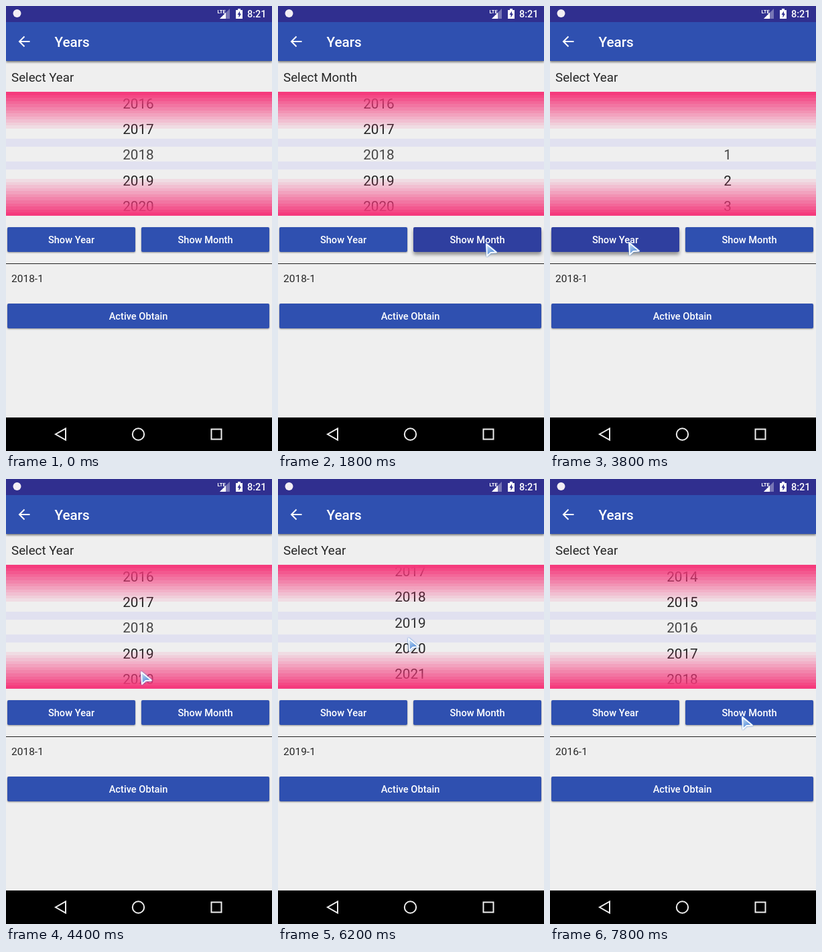
An HTML page that plays this animation: 397x664 px, repeating every 8 s.

```html
<!DOCTYPE html>
<html lang="en">
<head>
<meta charset="utf-8">
<title>Years</title>
<style>
html, body { margin: 0; width: 100%; height: 100%; overflow: hidden; background: #efefef; }
svg { display: block; width: 397px; height: 664px; font-family: Roboto, sans-serif; }
.mid { text-anchor: middle; }
.medium { font-weight: 500; fill: #fff; }
.btn rect { fill: #2f50b0; filter: drop-shadow(0 1.5px 1px #0006); }
.btn.down rect { fill: #2f3f9f; filter: drop-shadow(0 4px 2.5px #0006); }
.btn text { font-size: 14.65px; }
.nav { fill: none; stroke: #eee; stroke-width: 2; }
</style>
</head>
<body>
<svg viewBox="0 0 397 664">
  <defs>
    <linearGradient id="blue" x2=".6" y2="1">
      <stop offset="0" stop-color="#d5e8f8"/>
      <stop offset="1" stop-color="#3b7cd4"/>
    </linearGradient>
    <clipPath id="clip"><rect y="128" width="397" height="185"/></clipPath>
  </defs>
  <rect width="397" height="664" fill="#efefef"/>

  <rect y="24" width="397" height="58" fill="#2f50b0" style="filter:drop-shadow(0 2px 1.5px #0007)"/>
  <rect width="397" height="24" fill="#302f8f"/>
  <circle cx="16.5" cy="11" r="6" fill="#f3eef4"/>
  <text x="315.5" y="10.5" font-size="7.5" font-weight="700" fill="#fff">LTE</text>
  <path d="M319 19L334 4V19Z" fill="#7776b5"/>
  <path d="M319 19L328 10V19Z" fill="#fff"/>
  <path d="M343 6h3V4h4v2h3V19H343Z" fill="#fff"/>
  <path d="M349 7.5L345.5 13H347.5V17.5L351 11.5H349Z" fill="#302f8f"/>
  <text class="medium" x="360" y="17" font-size="14.5">8:21</text>
  <path d="M35.5 53H20.5M27.5 45.5L20 53L27.5 60.5" fill="none" stroke="#fff" stroke-width="2"/>
  <text class="medium" x="72.5" y="61" font-size="20.7">Years</text>

  <text id="label" x="8" y="113" font-size="18.75" fill="#262626"></text>
  <g clip-path="url(#clip)">
    <g id="wheel" class="mid" font-size="20.7"></g>
    <rect y="198" width="397" height="46" fill="#efefef" opacity=".06"/>
    <path d="M0 198H397V210H0ZM0 232H397V244H0Z" fill="#9696f0" opacity=".16"/>
    <g id="bands" fill="#f5387b"></g>
  </g>

  <g id="buttons"></g>
  <rect y="384" width="397" height="1" fill="#222"/>
  <text id="value" x="8" y="412" font-size="15.5" fill="#262626"></text>

  <rect y="614" width="397" height="50"/>
  <path class="nav" d="M89 630.5V647.5L74 639Z"/>
  <circle class="nav" cx="197.5" cy="639" r="8.7"/>
  <rect class="nav" x="306.5" y="631.5" width="15" height="15"/>

  <path id="cursor" d="M2 2L3 20L8.500 15L17 14.500Z" fill="url(#blue)" stroke="#fff"
    stroke-width="1.8" stroke-linejoin="round" style="filter:drop-shadow(0 0 .8px #3f86d8)"/>
</svg>
<script>
const LOOP = 8000, STEP = 200, ROW = 38.4, CENTER = 197.5;
const $ = id => document.getElementById(id);

// time, x, y of the cursor; straight moves between
const path = [
  [200, 356, 368], [600, 356, 368], [1000, 309, 353], [2400, 309, 353],
  [2600, 251, 350], [3000, 251, 350], [3200, 200, 346], [3400, 116, 351],
  [4000, 116, 351], [4400, 200, 286], [5200, 200, 185], [5600, 195, 167],
  [6200, 193, 236], [7000, 196, 359], [7600, 251, 350], [7800, 285, 353]
];

function cursorAt(t) {
  const i = path.findIndex(p => p[0] >= t);
  if (i < 1) return path[0].slice(1);
  const [t0, x0, y0] = path[i - 1], [t1, x1, y1] = path[i];
  const k = (t - t0) / (t1 - t0);
  return [x0 + (x1 - x0) * k, y0 + (y1 - y0) * k];
}

// the wheel follows the cursor: one drag up, one drag down
function yearAt(t, y) {
  if (t < 4400) return 2018;
  if (t <= 5600) return Math.min(2021, 2018 + (286 - y) / ROW);
  return t < 7000 ? 2021 - (y - 167) / ROW : 2016;
}

const BANDS = 12, BAND = 55 / BANDS;
for (let i = 0; i < BANDS; i++) {
  const y = Math.round(128 + i * BAND), next = Math.round(128 + (i + 1) * BAND);
  const band = top => `<rect y="${top}" width="397" height="${next - y}" opacity="${0.98 - i * 0.08}"/>`;
  $("bands").innerHTML += band(y) + band(441 - next);
}

const button = (x, y, w, text) => `<g class="btn"><rect x="${x}" y="${y}" width="${w}" height="37" rx="2"/>
  <text class="mid medium" x="${x + w / 2}" y="${y + 24}">${text}</text></g>`;
$("buttons").innerHTML = button(2, 330, 191, "Show Year") +
  button(202, 330, 191, "Show Month") + button(2, 444, 391, "Active Obtain");
const [yearButton, monthButton] = document.querySelectorAll(".btn");

function drawWheel(x, pos, min) {
  let rows = "";
  for (let v = Math.max(min, Math.round(pos) - 3); v <= pos + 3; v++) {
    const y = Math.round(229.4 + (v - pos) * ROW);
    rows += `<text x="${x}" y="${y}" fill="${v === pos ? "#3c3c3c" : "#222"}">${v}</text>`;
  }
  $("wheel").innerHTML = rows;
}

let shown = -1;
function frame(now) {
  requestAnimationFrame(frame);
  const t = Math.floor(now % LOOP / STEP) * STEP;
  if (t === shown) return;
  shown = t;
  const within = (from, to) => t >= from && t < to;
  const [x, y] = cursorAt(t), year = yearAt(t, y);
  $("cursor").setAttribute("transform", `translate(${x} ${y})`);
  $("cursor").setAttribute("opacity", t ? 1 : 0);
  monthButton.classList.toggle("down", within(1200, 2200));
  yearButton.classList.toggle("down", within(3600, 4200));
  $("label").textContent = within(1800, 3800) ? "Select Month" : "Select Year";
  $("value").textContent = Math.round(year) + "-1";
  // the leaving wheel slides aside before the other one takes its place
  if (within(2000, 4200)) drawWheel(t < 3800 ? CENTER : 265, 1, 1);
  else drawWheel(t === 1800 ? 150.5 : CENTER, year, 0);
}
requestAnimationFrame(frame);
</script>
</body>
</html>
```
